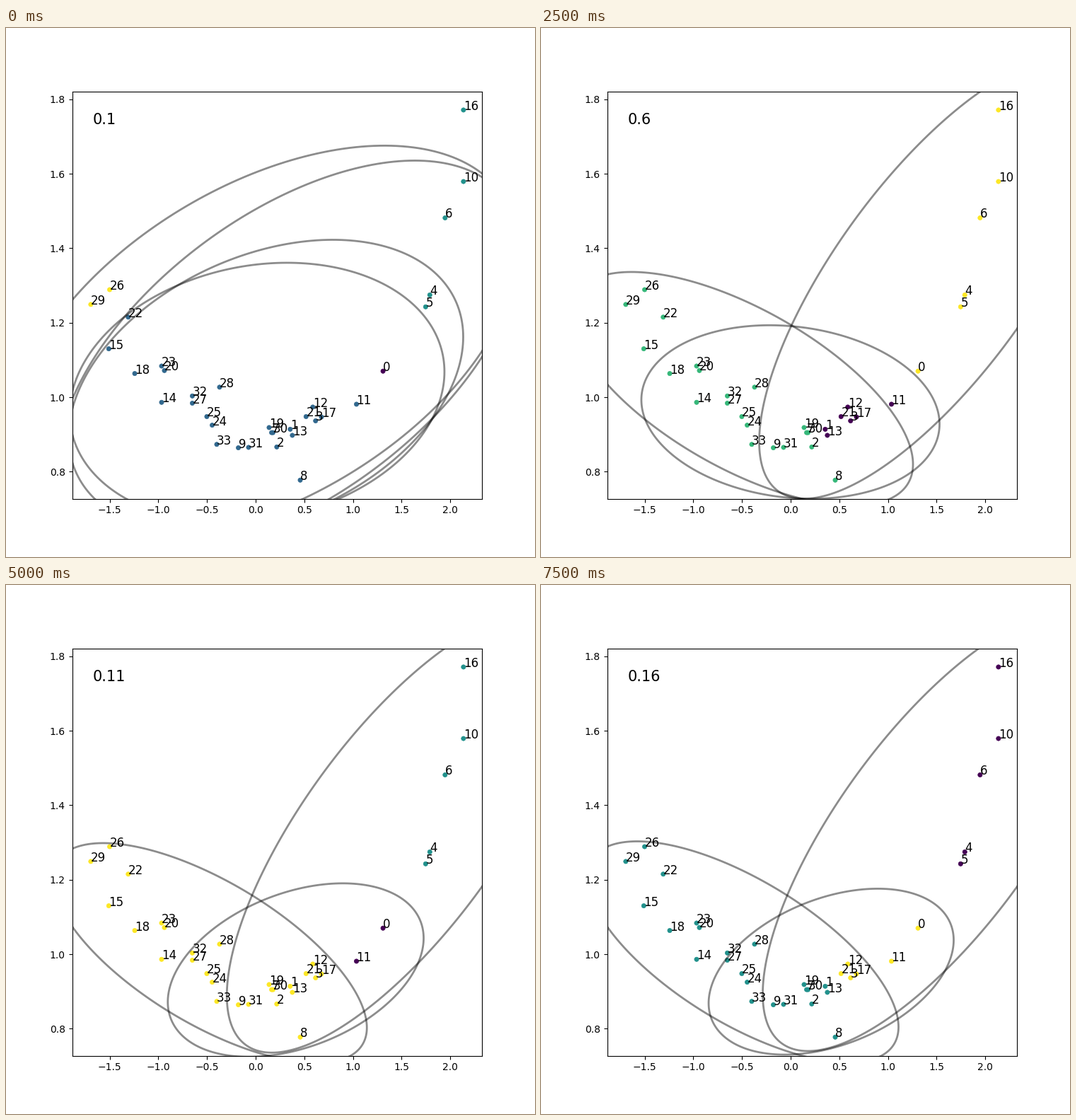
Recreate the animation shown at these times as a matplotlib script. Size 748 by 748 pixels, loop 8000 ms.

```python
import numpy as np
import matplotlib.pyplot as plt
from matplotlib.animation import FuncAnimation
from matplotlib.patches import Polygon

STEPS, STEP_MS = 16, 500

# Node embedding, one (x, y) per node id
NODES = np.array([
    (1.309, 1.070), (.355, .914), (.217, .8665), (.616, .9366), (1.790, 1.2745),
    (1.747, 1.2426), (1.947, 1.4814), (.164, .905), (.458, .7775), (-.178, .8643),
    (2.136, 1.579), (1.036, .9812), (.587, .9736), (.377, .8977), (-.967, .9863),
    (-1.510, 1.130), (2.136, 1.771), (.676, .947), (-1.243, 1.0636), (.138, .9186),
    (-.938, 1.0716), (.518, .948), (-1.310, 1.215), (-.967, 1.0837), (-.447, .925),
    (-.502, .948), (-1.501, 1.2887), (-.651, .984), (-.371, 1.027), (-1.695, 1.249),
    (.178, .905), (-.073, .8654), (-.651, 1.0034), (-.400, .8734),
])

# Gaussian components at key steps: centre x, y, half extents x, y, correlation
KEY_STEPS = [0, 3, 5, 7, 9, 11, 12, 15]
KEY_ROWS = [0, 1, 2, 3, 4, 5, 5, 6]
MIDDLE = [
    (.1054, 1.0279, 2.028, .3947, .339),
    (-.0909, .9812, 1.708, .2667, -.25),
    (-.0022, .9603, 1.5324, .2329, -.14),
    (.3707, .9641, 1.4103, .2430, .34),
    (.4180, .9660, 1.3958, .2487, .36),
    (.4053, .9489, 1.2340, .2170, .375),
    (.4162, .9532, 1.2594, .2227, .38),
]
LEFT = [
    (.0145, 1.0125, 1.926, .3484, .16),
    (-.3438, 1.0053, 1.7687, .2986, -.545),
    (-.5002, 1.0226, 1.7578, .3136, -.646),
    (-.4224, .9987, 1.6546, .2929, -.676),
    (-.4224, .9983, 1.6364, .2905, -.679),
    (-.5198, 1.0080, 1.5920, .2998, -.678),
    (-.4922, 1.0061, 1.6008, .2969, -.678),
]
RIGHT = [
    (.0923, 1.1483, 2.604, .5270, .473),
    (1.2794, 1.2982, 2.1663, .6341, .77),
    (1.4612, 1.3187, 1.7847, .5912, .741),
    (1.4685, 1.3191, 1.7810, .5923, .741),
    (1.4721, 1.3191, 1.7810, .5923, .741),
    (1.5026, 1.3324, 1.7861, .5876, .74),
    (1.4975, 1.3296, 1.7847, .5895, .74),
]
EXTRA = [(.3417, 1.1103, 2.374, .5249, .545)] + RIGHT[1:]
EXTRA_STEPS = 2  # the fourth component merges into RIGHT after this

# Labelling: first step, colour of most nodes, {colour: other nodes}
TAIL = [4, 5, 6, 10, 16]
LABELS = [
    (0, 1 / 3, {0: [0], .5: TAIL, 1: [26, 29]}),
    (2, 2 / 3, {0: [3, 11, 12, 17], 1: [0] + TAIL}),
    (5, 2 / 3, {0: [1, 3, 11, 12, 13, 17, 21], 1: [0] + TAIL}),
    (7, 1, {0: [0, 11], .5: TAIL}),
    (12, .5, {0: TAIL, 1: [0, 3, 11, 12, 17, 21]}),
]

ANGLE = np.linspace(0, 2 * np.pi, 240, endpoint=False)


def outline(rows, step):
    table = np.array(rows)[KEY_ROWS]
    cx, cy, sx, sy, rho = (np.interp(step, KEY_STEPS, col) for col in table.T)
    u, v = np.cos(ANGLE), np.sin(ANGLE)
    return np.column_stack([cx + sx * u,
                            cy + sy * (rho * u + np.sqrt(1 - rho**2) * v)])


def node_colors(step):
    _, base, groups = [entry for entry in LABELS if entry[0] <= step][-1]
    values = np.full(len(NODES), base, dtype=float)
    for value, ids in groups.items():
        values[ids] = value
    return plt.cm.viridis(values)


fig, ax = plt.subplots(figsize=(7.48, 7.48), dpi=100)
dots = ax.scatter(*NODES.T, s=20, linewidths=.5)
for i, (x, y) in enumerate(NODES):
    ax.annotate(str(i), (x, y), fontsize=12)
ax.set_xlim(-1.8866, 2.3276)
ax.set_ylim(.7273, 1.8207)

COMPONENTS = [MIDDLE, LEFT, RIGHT, EXTRA]
rings = [ax.add_patch(Polygon(outline(rows, 0), closed=True, fill=False,
                              edgecolor="black", linewidth=2, alpha=.45))
         for rows in COMPONENTS]
counter = ax.text(.05, .92, "", transform=ax.transAxes, fontsize=15)


def update(step):
    for ring, rows in zip(rings, COMPONENTS):
        ring.set_xy(outline(rows, step))
    rings[-1].set_visible(step < EXTRA_STEPS)
    dots.set_color(node_colors(step))
    counter.set_text(f"0.{step + 1}")
    return [*rings, dots, counter]


anim = FuncAnimation(fig, update, frames=STEPS, interval=STEP_MS,
                     repeat=True, repeat_delay=0)
plt.show()
```
